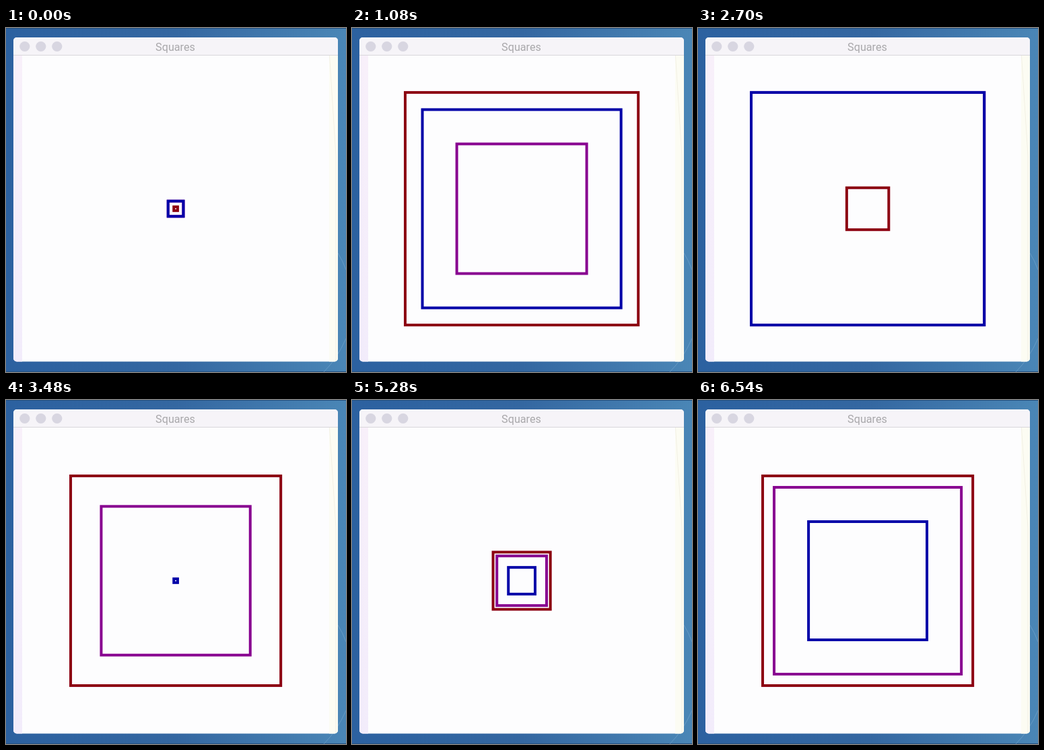
Write an HTML page that moves like this. It is 505 px wide and 512 px high and loops after 6.6 s.

```html
<!DOCTYPE html>
<html lang="en">
<head>
<meta charset="utf-8">
<title>Squares</title>
<style>
  html, body { margin: 0; width: 100%; height: 100%; overflow: hidden; background: #3068a4; }
  svg { display: block; width: 100vw; height: 100vh; }
  .title { font: 16.2px Roboto, Inter, sans-serif; fill: #a9a8ab; text-anchor: middle; }
  .square { fill: none; stroke-width: 4; }
</style>
</head>
<body>
<svg viewBox="0 0 505 512">
  <defs>
    <linearGradient id="desk">
      <stop offset="0" stop-color="#2c61a0"/>
      <stop offset=".5" stop-color="#3467a1"/>
      <stop offset="1" stop-color="#4a86b6"/>
    </linearGradient>
    <linearGradient id="margin" x2="0" y2="1">
      <stop offset="0" stop-color="#f8f0fa"/>
      <stop offset="1" stop-color="#f2ecfb"/>
    </linearGradient>
    <clipPath id="frame"><rect x="11" y="14" width="482" height="482.5" rx="5"/></clipPath>
  </defs>

  <rect width="505" height="512" fill="url(#desk)"/>
  <rect width="505" height="1" fill="#24507f"/>
  <rect y="511" width="505" height="1" fill="#24507f"/>
  <g fill="none" stroke="#79a8cf" stroke-opacity=".6">
    <path d="M493 335 Q500 346 505 360"/>
    <path d="M472 512 Q492 492 505 462"/>
  </g>

  <g clip-path="url(#frame)">
    <rect x="11" y="14" width="482" height="483" fill="#fdfdfe"/>
    <rect x="11" y="41" width="13" height="456" fill="url(#margin)"/>
    <path d="M480 41 H493 V497 H480Z" fill="#fcfcf3"/>
    <path d="M480.5 41 L490 190 V497" fill="none" stroke="#f2f0e4"/>
    <rect x="11" y="14" width="482" height="26" fill="#f6f4f8"/>
    <rect x="11" y="40" width="482" height="1" fill="#d9d7db"/>
  </g>
  <g fill="#d8d6e1">
    <circle cx="27.8" cy="27.5" r="7.6"/>
    <circle cx="51.8" cy="27.5" r="7.6"/>
    <circle cx="75.8" cy="27.5" r="7.6"/>
  </g>
  <text class="title" x="251.5" y="34">Squares</text>
  <g id="squares"></g>
</svg>
<script>
const LOOP = 6600, FRAME = 60;
const TICKS_PER_FRAME = 1.717;
const UNIT = 5.675;
const CENTER = { x: 252.1, y: 269 };

// Each side bounces between low and low + step * half, one step per tick.
const squares = [
  { color: '#8c0012', step: 2, low: -1, half: 36, phase: 1 },
  { color: '#880090', step: 1, low: 0, half: 71, phase: 4 },
  { color: '#0000a8', step: 3, low: -2, half: 25, phase: 2 },
];

const layer = document.getElementById('squares');
for (const square of squares) {
  square.node = document.createElementNS('http://www.w3.org/2000/svg', 'rect');
  square.node.setAttribute('class', 'square');
  square.node.setAttribute('stroke', square.color);
  layer.append(square.node);
}

function sideAt({ step, low, half, phase }, tick) {
  const turn = (tick + phase) % (2 * half);
  return Math.abs(low + step * (half - Math.abs(half - turn))) * UNIT;
}

function draw(ms) {
  const tick = Math.floor(Math.floor((ms % LOOP) / FRAME) * TICKS_PER_FRAME);
  for (const square of squares) {
    const side = sideAt(square, tick);
    square.node.setAttribute('x', CENTER.x - side / 2);
    square.node.setAttribute('y', CENTER.y - side / 2);
    square.node.setAttribute('width', side);
    square.node.setAttribute('height', side);
  }
}

const start = performance.now();
function loop() {
  draw(performance.now() - start);
  requestAnimationFrame(loop);
}
loop();
</script>
</body>
</html>
```
